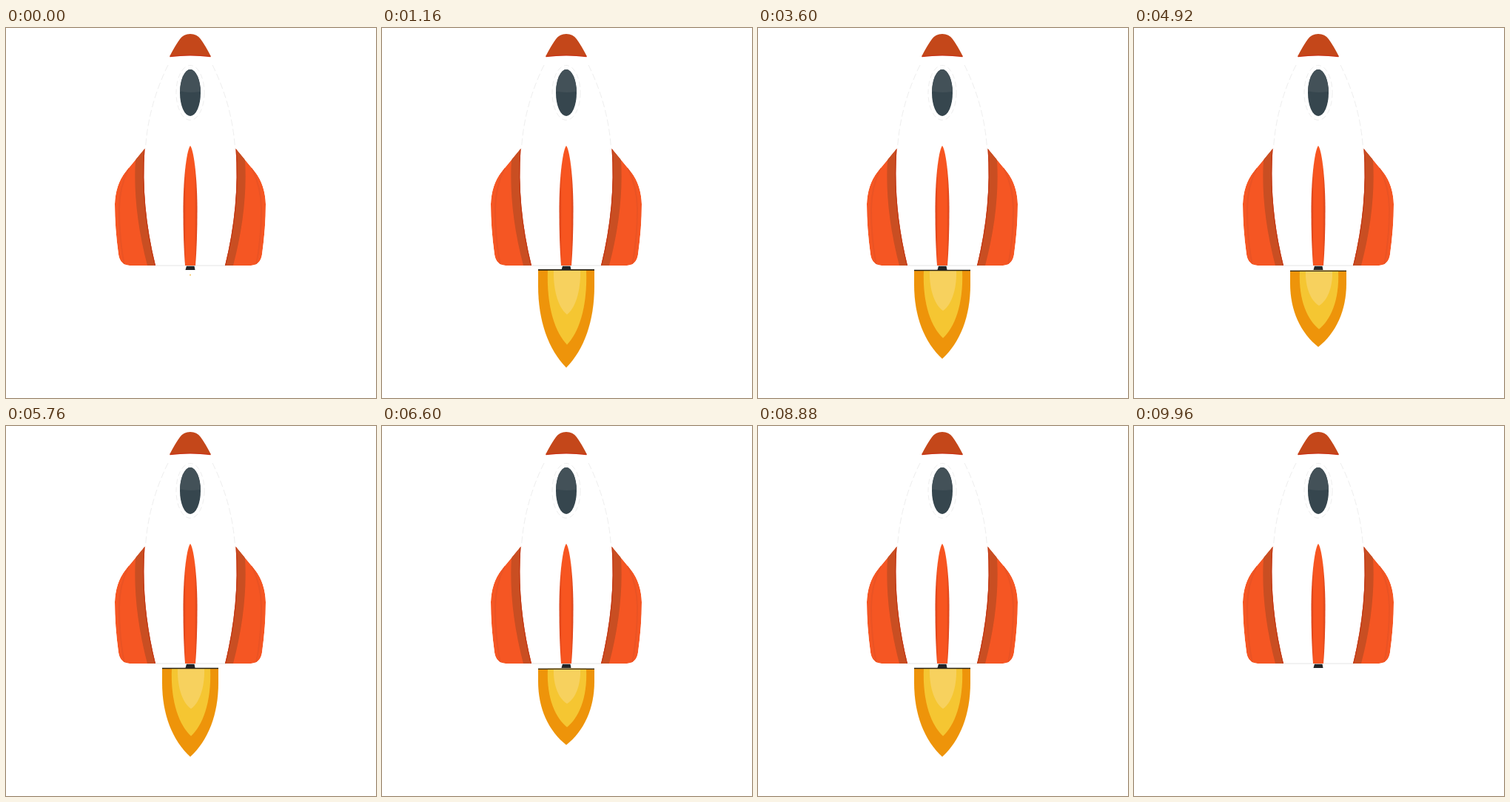
An HTML page for the animation above (10000 ms loop, 500 by 500 pixels).

```html
<!DOCTYPE html>
<html lang="en">
<head>
<meta charset="utf-8">
<title>Rocket</title>
<style>
  html, body { margin: 0; width: 100%; height: 100%; overflow: hidden; background: #fff; }
  svg { display: block; width: 100%; height: 100%; }
</style>
</head>
<body>
<svg viewBox="0 0 500 500">
  <defs>
    <linearGradient id="stripe">
      <stop offset="0" stop-color="#d8411a"/>
      <stop offset=".2" stop-color="#f75520"/>
      <stop offset=".8" stop-color="#f75520"/>
      <stop offset="1" stop-color="#d8411a"/>
    </linearGradient>
    <clipPath id="finShape">
      <path id="finPath" d="M187.500 163L161 195Q148 212 147 238Q147 270 152 306Q154 320 167 321H202Q182 240 187.500 163Z"/>
    </clipPath>
    <clipPath id="glass"><ellipse cx="249" cy="87.500" rx="14" ry="31.500"/></clipPath>
    <g id="side">
      <path d="M219 50Q192 105 188.500 163" fill="none" stroke="#eee" stroke-dasharray="9 4"/>
      <g clip-path="url(#finShape)">
        <use href="#finPath" fill="#f55623"/>
        <path d="M166 189Q153 215 153 245Q153 285 160 321" fill="none" stroke="#ea5324" stroke-width="2"/>
        <path d="M190 155L175 178Q171 245 191 321H204Q182 240 190 155Z" fill="#c94e22"/>
        <path d="M187.500 163Q182 240 202 321" fill="none" stroke="#c33a17" stroke-width="2.500"/>
      </g>
    </g>
  </defs>

  <g id="flame">
    <path d="M211 327V347C211 390 225 425 249 447C273 425 287 390 287 347V327Z" fill="#ee940a"/>
    <path d="M224 327C222 375 235 405 250 419C265 405 278 375 276 327Z" fill="#f5c632"/>
    <path d="M232 327C231 355 240 376 250 382C260 376 269 355 268 327Z" fill="#f7d15e"/>
    <path d="M211 327.500H287" stroke="#2b2415" stroke-width="1.500"/>
  </g>

  <path d="M244 321.500H254.500L255.500 327H242.500Z" fill="#222528"/>
  <path d="M202 321H297" stroke="#e4e4e4"/>
  <use href="#side"/>
  <use href="#side" transform="matrix(-1 0 0 1 498 0)"/>
  <path d="M249 159C255 168 258.500 210 258.500 245Q258.500 290 256 321H242Q239.500 290 239.500 245C239.500 210 243 168 249 159Z" fill="url(#stripe)"/>
  <path d="M221 38.500Q229 23 235 15Q240 8 249 8Q258 8 263 15Q269 23 277 38.500Q249 35 221 38.500Z" fill="#c4471a"/>
  <path d="M221.500 38.500Q249 35 276.500 38.500" fill="none" stroke="#c93516" stroke-width="1.500"/>
  <ellipse cx="249" cy="87.500" rx="19" ry="37" fill="none" stroke="#eee" stroke-dasharray="7 4"/>
  <g clip-path="url(#glass)">
    <path d="M230 50H270V130H230Z" fill="#36464e"/>
    <path d="M230 50H270V84Q249 90 230 84Z" fill="#435158"/>
  </g>
</svg>
<script>
  const flame = document.getElementById("flame");
  const STEP = 40, STEPS = 250;
  const IGNITED = 5, CUTOFF = 245;
  const flicker = [1.105, 1, 0.86, 0.754, 0.86, 1];

  function flameScale(step) {
    const power = Math.min(1, Math.max(0.015, step / IGNITED), (STEPS - 1 - step) / (STEPS - 1 - CUTOFF));
    const stretch = power < 1 ? flicker[0] : flicker[(step + 1) % flicker.length];
    return [power, power * stretch];
  }

  function draw() {
    const step = Math.floor(performance.now() / STEP) % STEPS;
    const [sx, sy] = flameScale(step);
    flame.setAttribute("transform", `translate(249 333) scale(${sx} ${sy}) translate(-249 -333)`);
    requestAnimationFrame(draw);
  }
  draw();
</script>
</body>
</html>
```
